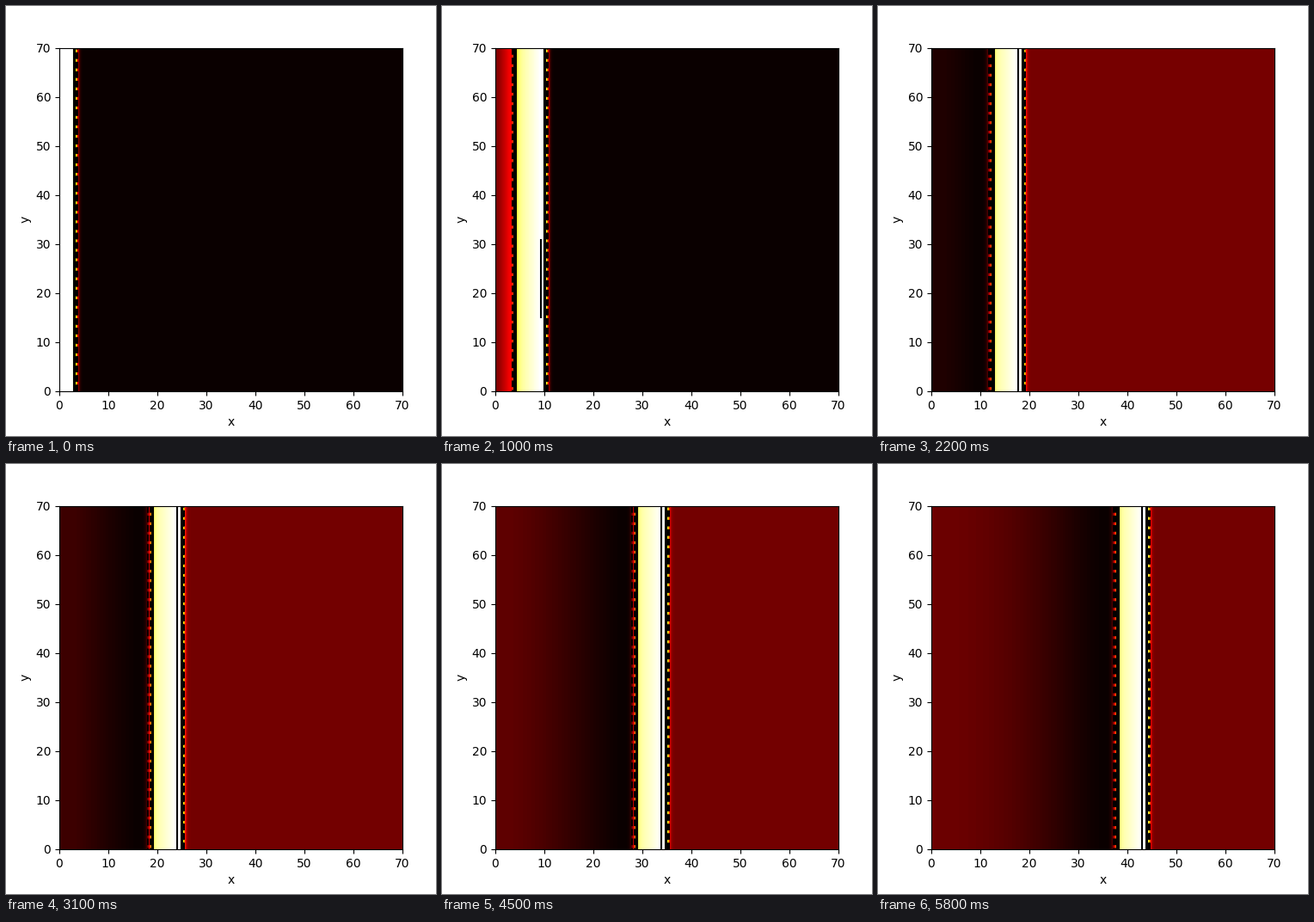
A matplotlib script that plays this animation: 500x500 px, repeating every 5900 ms.

```python
import numpy as np
import matplotlib.pyplot as plt
from matplotlib.animation import FuncAnimation

FRAMES, STEP_MS = 59, 100
SIZE = 70                    # domain width and height
COLS = 399                   # one column per pixel
SCALE = COLS / SIZE
FRONT0, SPEED = 20.2, 4.02   # front start and speed, in columns
CORE = 20.0                  # columns excited from the beginning
WIDTH = 34.4                 # length of the excited plateau

# contour offsets from the front and from the end of the plateau
FRONT_LINES = [(-3, "-"), (-2, "-"), (-.6, "--"), (.4, "--")]
BACK_LINES = [(1.2, "-"), (2.9, "-"), (4.8, "--"), (7.3, "--")]
CREST = 7.9


def sigmoid(x):
    return .5 * (1 + np.tanh(x / 2))


def front(t):
    return FRONT0 + SPEED * t


def settle(t, tau):
    """1 while the pulse is forming, then decaying to 0."""
    return np.exp(-max(t - 14, 0) / tau)


def back_stretch(t):
    return 1 + .3 * settle(t, 4)


def field(t):
    """Excitation along x: rest, steep rise, plateau, fall, slow recovery."""
    rest = .163 + .012 * settle(t, 6)
    col = np.arange(COLS) + .5
    start = np.maximum(col, CORE - .1 * (CORE - col))
    lag = front(t) - start
    tail = (lag - WIDTH) / back_stretch(t)

    plateau = 1 - .1 * np.clip((lag - 8) / (WIDTH - 8), 0, 1)
    fall = sigmoid((tail - 5) / 1.7)
    recovery = 1 - np.exp(-(np.maximum(tail, 0) / 112) ** 1.8)
    excited = plateau * (1 - fall) + rest * recovery

    rise = sigmoid((front(t) - col + .6) / 1.2)
    return rest + (excited - rest) * rise


def crest_spans(t):
    """Vertical pieces of the contour that follows the crest."""
    if t >= 16:
        return [(0, SIZE)]
    spans = []
    if t >= 3:
        mid, half = 18 + .5 * t, 9.7 - .16 * t
        spans.append((mid - half, mid + half))
    if t >= 11:
        spans.append((49.5, 55.6))
    return spans


fig = plt.figure(figsize=(5, 5), dpi=100)
ax = fig.add_axes([62 / 500, 52.2 / 500, COLS / 500, COLS / 500])
image = ax.imshow(field(0)[None, :], cmap="hot", origin="lower",
                  extent=(0, SIZE, 0, SIZE), aspect="auto",
                  interpolation="nearest")
ax.set(xlim=(0, SIZE), ylim=(0, SIZE), xlabel="x", ylabel="y")


def contour_line(style="-"):
    return ax.plot([], [], color="black", lw=1.5, ls=style,
                   solid_capstyle="butt")[0]


front_lines = [contour_line(style) for _, style in FRONT_LINES]
back_lines = [contour_line(style) for _, style in BACK_LINES]
crest = contour_line()


def update(t):
    u = field(t)
    image.set_data(u[None, :])
    image.set_clim(u.min(), u.max())

    f = front(t)
    for line, (offset, _) in zip(front_lines, FRONT_LINES):
        x = (f + offset) / SCALE
        line.set_data([x, x], [0, SIZE])

    for line, (offset, _) in zip(back_lines, BACK_LINES):
        col = f - WIDTH - offset * back_stretch(t)
        line.set_data([col / SCALE] * 2, [SIZE, 0])
        line.set_visible(col > CORE - 2)

    ys = [y for lo, hi in crest_spans(t) for y in (lo, hi, np.nan)]
    crest.set_data([(f - CREST) / SCALE] * len(ys), ys)
    return [image, crest, *front_lines, *back_lines]


anim = FuncAnimation(fig, update, frames=FRAMES, interval=STEP_MS,
                     repeat=True, repeat_delay=0, blit=False)
plt.show()
```
